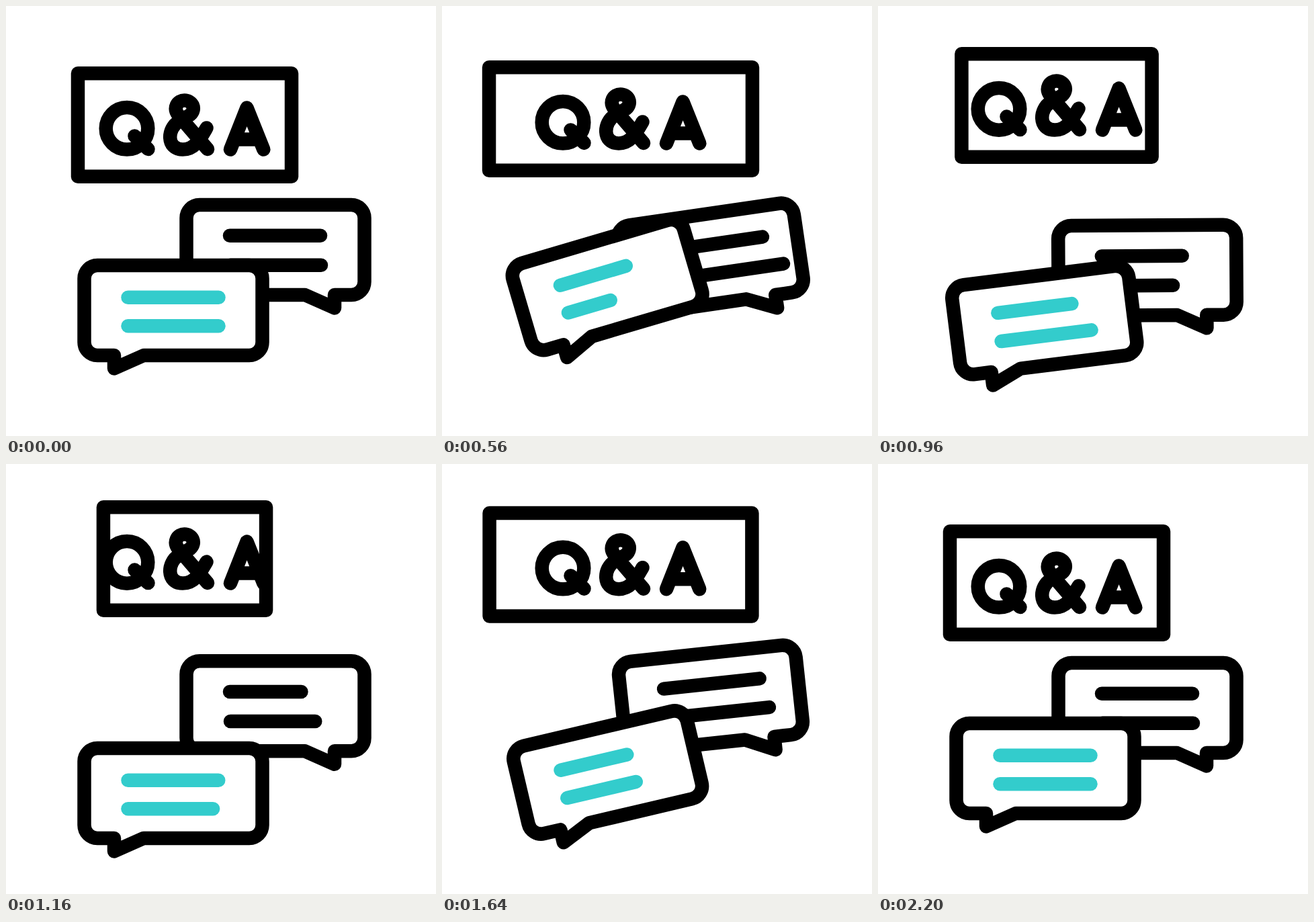
These frames come from a looping animation (640 px wide and 640 px high, 2.44 s). An HTML page:

```html
<!DOCTYPE html>
<html lang="en">
<head>
<meta charset="utf-8">
<title>Questions and answers</title>
<style>
  html, body { margin: 0; width: 100%; height: 100%; overflow: hidden; background: #fff; }
  svg { display: block; width: 100vw; height: 100vh; }
  .ink { fill: none; stroke: #000; stroke-width: 20.5; stroke-linecap: round; stroke-linejoin: round; }
  .bubble { fill: #fff; }
  .teal { stroke: #33cccc; }
</style>
</head>
<body>
<svg viewBox="0 0 640 640" class="ink">
  <defs>
    <path id="bubble" d="M205 520H362A19.5 19.5 0 0 0 381.5 500.5V405.5A19.5 19.5 0 0 0 362 386H136A19.5 19.5 0 0 0 116.5 405.5V500.5A19.5 19.5 0 0 0 136 520H161V539.5Z"/>
  </defs>
  <g id="sign">
    <rect id="board" y="100.3" height="153.5"/>
    <circle cx="180" cy="182.3" r="31.3"/>
    <path d="M191.5 193.5L211.5 213"/>
    <path d="M300 213L257 163C248 152 255 140.5 265.5 140.5C277 140.5 284 153 274 162L257 172C240 182 238 213.5 263 213.5C281 213.5 289 198 298.5 181.5"/>
    <path d="M334 213.5L358.5 151.5L383.3 213.5M341 198.5H376"/>
  </g>
  <g id="back">
    <use href="#bubble" class="bubble" transform="matrix(-1 0 0 1 650 -90)"/>
    <line id="back1" x1="333" y1="341.7" y2="341.7"/>
    <line id="back2" x1="334" y1="385.7" y2="385.7"/>
  </g>
  <g id="front">
    <use href="#bubble" class="bubble"/>
    <line id="front1" class="teal" x1="181.5" y1="433.7" y2="433.7"/>
    <line id="front2" class="teal" x1="181.5" y1="476.2" y2="476.2"/>
  </g>
</svg>
<script>
const LOOP = 2440, STEP = 40;
const SHAKE = 1040, WOBBLE = 320, LINE = 135;

const el = id => document.getElementById(id);

// Sine-eased rise from 0 to 1 between two times.
function ramp(t, from, to) {
  const p = Math.min(1, Math.max(0, (t - from) / (to - from)));
  return (1 - Math.cos(Math.PI * p)) / 2;
}

// Eased rise to 1 and fall back to 0.
const pulse = (t, from, peak, to) => ramp(t, from, peak) - ramp(t, peak, to);

// Two turns of a sine wave, still before and after.
function wobble(t, from) {
  const turns = (t - from) / WOBBLE;
  return turns > 0 && turns < 2 ? 2 * Math.PI * turns : 0;
}

function pose(id, dy, angle = 0, cx = 0, cy = 0) {
  el(id).setAttribute('transform', `translate(0 ${dy}) rotate(${angle} ${cx} ${cy})`);
}

function setLine(id, change) {
  const line = el(id);
  line.setAttribute('x2', +line.getAttribute('x1') + LINE + change);
}

function drawSign(t) {
  const grow = pulse(t, 180, 605, 1150) - pulse(t, 605, 1150, 1690) + pulse(t, 1150, 1690, 2190);
  const left = 107 - 38 * grow;
  el('board').setAttribute('x', left);
  el('board').setAttribute('width', 532 - 2 * left);
  pose('sign', -38 * pulse(t, 190, 1330, 2200));
}

function drawBack(t, shakeTime) {
  const dy = 38.5 * pulse(t, 380, 830, 1390) - 26 * pulse(t, 830, 1390, 1930);
  pose('back', dy, -8.3 * Math.sin(wobble(shakeTime, 482)), 401, 373);
  setLine('back1', 16 * pulse(t, 180, 660, 1140) - 29 * pulse(t, 660, 1140, 1440) + 14 * pulse(t, 1140, 1440, 1900));
  const dip = ramp(t, 540, 840) - ramp(t, 1000, 1420);
  setLine('back2', 39 * pulse(t, 180, 540, 840) - 30 * dip + 37 * pulse(t, 1000, 1420, 1840));
}

function drawFront(t, shakeTime) {
  const dy = -38.5 * ramp(t, 180, 580) + 75.5 * ramp(t, 615, 1160) - 37 * ramp(t, 1150, 1810);
  pose('front', dy, -16.5 * Math.sin(wobble(shakeTime, 393) / 2) ** 2, 249, 463);
  setLine('front1', -45 * pulse(t, 180, 760, 1180) - 46 * pulse(t, 1180, 1480, 1940));
  setLine('front2', -71 * pulse(t, 180, 520, 970) - 72 * pulse(t, 1080, 1440, 1800));
}

function draw(t) {
  // The bubbles shake twice per loop.
  const shakeTime = t < 1240 ? t : t - SHAKE;
  drawSign(t);
  drawBack(t, shakeTime);
  drawFront(t, shakeTime);
}

const start = performance.now();
function tick() {
  const t = (performance.now() - start) % LOOP;
  draw(Math.floor(t / STEP) * STEP);
  requestAnimationFrame(tick);
}
tick();
</script>
</body>
</html>
```
